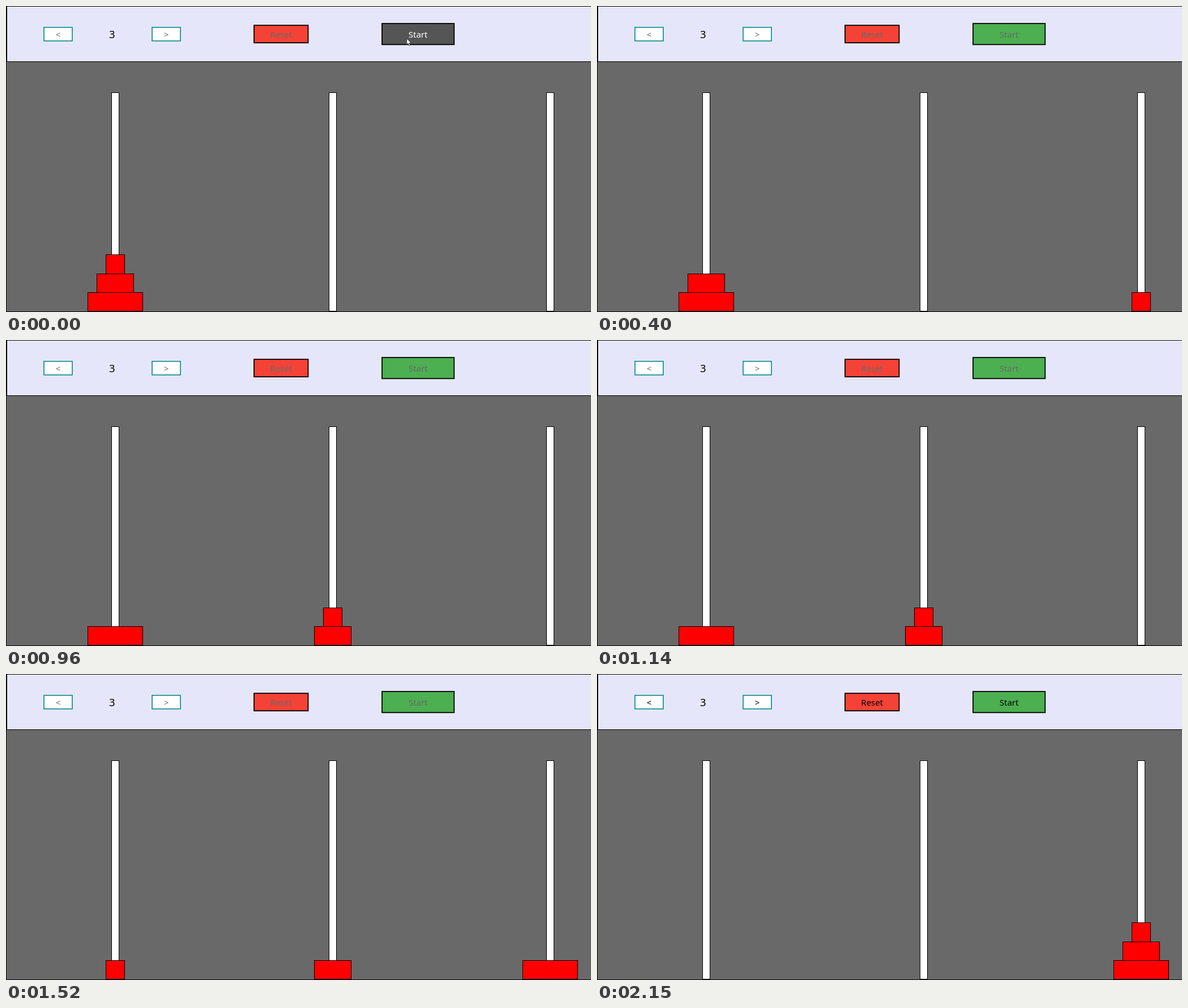
An HTML page for the animation above (3.09 s loop, 1033 by 542 pixels).

```html
<!DOCTYPE html>
<html lang="en">
<head>
<meta charset="utf-8">
<title>Tower puzzle</title>
<style>
  html, body { margin: 0; width: 100%; height: 100%; overflow: hidden; background: #696969; }
  svg { display: block; width: 1033px; height: 542px; }
  text { font: 15px "Noto Sans", "Open Sans", sans-serif; text-anchor: middle; }
  .count { font-size: 18.5px; }
  .button rect { stroke-width: 1.8; }
</style>
</head>
<body>
<svg id="stage" viewBox="0 0 1033 542"></svg>
<script>
const LOOP = 3090;
const PEGS = [193, 577, 961];
const FLOORS = [540.5, 507.5, 474.5, 440.5];
const WIDTHS = [33, 65, 97];
// [time, disk, destination peg]
const MOVES = [
  [400, 0, 2], [690, 1, 1], [960, 0, 1], [1240, 2, 2],
  [1520, 0, 0], [1830, 1, 2], [2150, 0, 2]
];
const PRESSED = 250;
const DONE = 2150;
const stage = document.getElementById("stage");

function add(name, attrs, parent = stage) {
  const node = document.createElementNS("http://www.w3.org/2000/svg", name);
  set(node, attrs);
  parent.append(node);
  return node;
}

function set(node, attrs) {
  for (const key in attrs) node.setAttribute(key, attrs[key]);
}

function rect(x, y, width, height, fill, stroke = "none", parent = stage) {
  return add("rect", { x, y, width, height, fill, stroke }, parent);
}

function button(x, y, width, height, fill, stroke, caption) {
  const group = add("g", { class: "button" });
  const box = rect(x, y, width, height, fill, stroke, group);
  const label = add("text", { x: x + width / 2, y: 55.7 }, group);
  label.textContent = caption;
  return { box, label };
}

rect(0, 0, 1033, 542, "#696969");
rect(0, 0, 1033, 98, "#e6e6fa");
rect(0, 0, 1033, 1, "#000");
rect(0, 0, 1, 542, "#000");
rect(1, 0, 1, 98, "#000");
rect(0, 98, 1033, 1, "#000");
rect(0, 541, 1033, 1, "#000");

const less = button(67, 37.8, 50, 24, "#fff", "#1a9393", "<");
const more = button(258, 37.8, 50, 24, "#fff", "#1a9393", ">");
const reset = button(438, 34.2, 95.5, 31, "#f44336", "#000", "Reset");
const start = button(664, 31, 127.3, 37.3, "#4caf50", "#000", "Start");
add("text", { x: 187.3, y: 57, class: "count" }).textContent = "3";

for (const x of PEGS) rect(x - 6.5, 153.5, 13, 387, "#fff", "#000");
const disks = WIDTHS.map(width => rect(0, 0, width, 33, "#f00", "#000"));
const pointer = add("path", {
  d: "M707.7 57.8V68.4L710 66.2L711.8 70.2L713.6 69.4L711.9 65.5H715.3Z",
  fill: "#fff", stroke: "#222", "stroke-width": 0.8
});

function towersAt(time) {
  const towers = [[2, 1, 0], [], []];
  for (const [when, disk, peg] of MOVES) {
    if (time < when) break;
    towers.find(tower => tower.includes(disk)).pop();
    towers[peg].push(disk);
  }
  return towers;
}

function render(time) {
  towersAt(time).forEach((tower, peg) => tower.forEach((disk, level) => set(disks[disk], {
    x: PEGS[peg] - WIDTHS[disk] / 2,
    y: FLOORS[level + 1],
    height: FLOORS[level] - FLOORS[level + 1]
  })));

  const hovered = time < PRESSED;
  const ink = time < DONE ? "#696969" : "#000";
  for (const { label } of [less, more, reset]) set(label, { fill: ink });
  set(start.label, { fill: hovered ? "#fff" : ink });
  set(start.box, { fill: hovered ? "#555" : "#4caf50" });
  set(pointer, { visibility: hovered ? "visible" : "hidden" });
}

const origin = performance.now();
function tick() {
  render((performance.now() - origin) % LOOP);
  requestAnimationFrame(tick);
}
tick();
</script>
</body>
</html>
```
